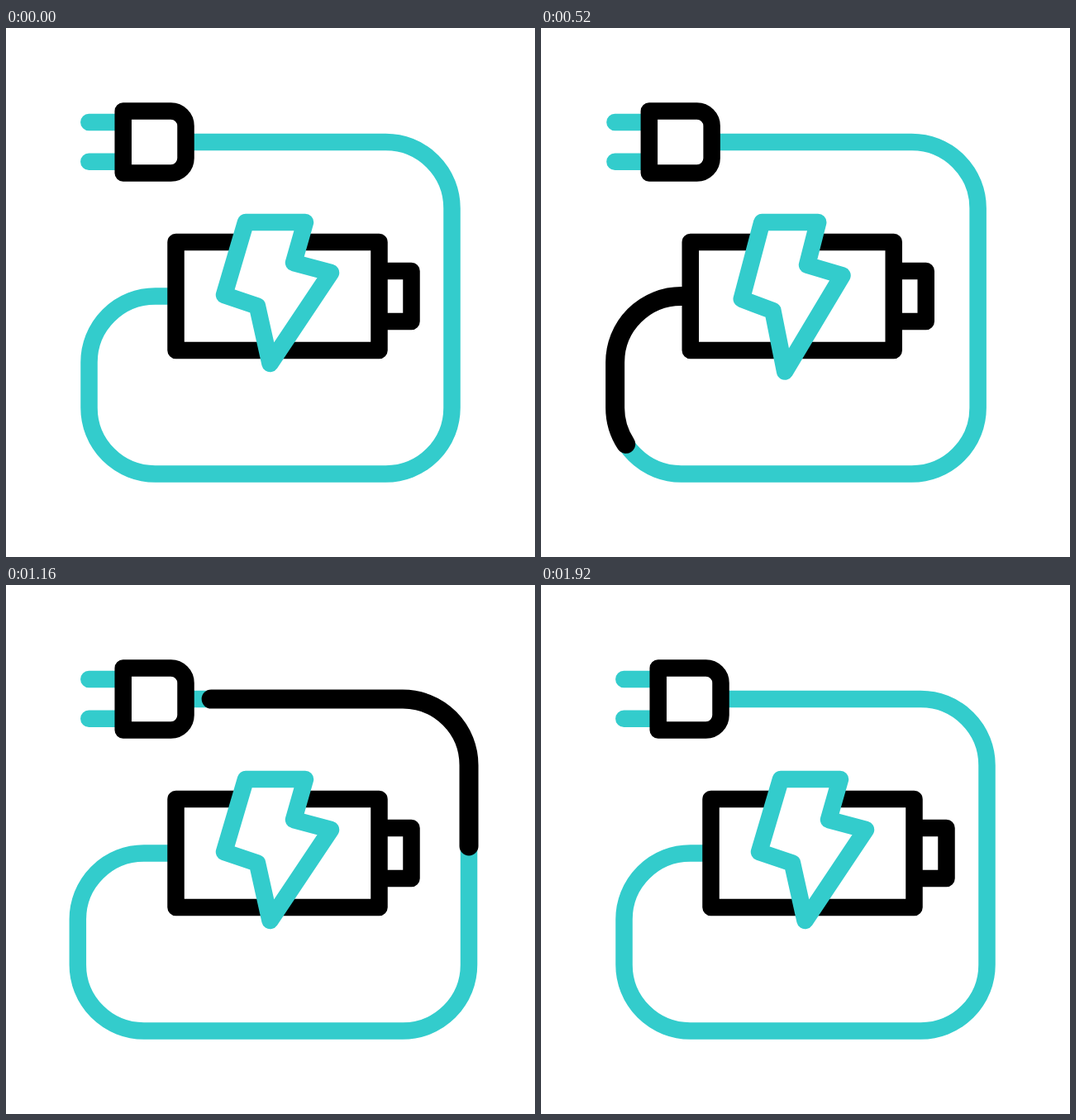
Write an HTML page that moves like this. It is 640 px wide and 640 px high and loops after 2.08 s.

```html
<!DOCTYPE html>
<html lang="en">
<head>
<meta charset="utf-8">
<title>Charging battery</title>
<style>
html, body { margin: 0; width: 100%; height: 100%; overflow: hidden; background: #fff; }
svg { display: block; width: 100%; height: 100%; fill: none; stroke-width: 20.5; stroke-linecap: round; stroke-linejoin: round; }
.teal { stroke: #3cc; }
.black { stroke: #000; }
.solid { fill: #fff; }
#pulse { stroke-width: 23; }
</style>
</head>
<body>
<svg viewBox="0 0 640 640">
  <path id="cord" class="teal"/>
  <path id="pulse" class="black" pathLength="1"/>
  <path id="spark" class="teal" pathLength="1" d="M128 143 109 130 90 143 71 130 52 143 34 130"/>
  <g id="plug">
    <path class="teal" d="M100.3 114H141M100.3 161.7H141"/>
    <path class="black solid" d="M141.7 100.5H199.5a18 18 0 0 1 18 18V157.5a18 18 0 0 1-18 18H141.7Z"/>
  </g>
  <g id="battery">
    <path class="black" d="M451.5 294H490.5V355H451.5"/>
    <path class="black solid" d="M205.5 259H451.5V390H205.5Z"/>
    <path id="bolt" class="teal solid"/>
  </g>
</svg>
<script>
const STEP = 40, STEPS = 52;
const BOLT = [[290, 235], [362, 235], [348, 284], [393, 296], [319.5, 406], [304, 336.5], [264, 323]];
const el = id => document.getElementById(id);
const clamp = u => Math.min(1, Math.max(0, u));
const smooth = u => u * u * (3 - 2 * u);
const cubic = u => u < .5 ? 4 * u ** 3 : 1 - 4 * (1 - u) ** 3;
const easeOut = u => 1 - (1 - u) ** 2;
const span = (n, from, to, ease) => ease(clamp((n - from) / (to - from)));

// Eased value through [step, value] keys
function track(n, ...keys) {
  let value = keys[0][1];
  for (let i = 1; i < keys.length; i++) {
    const [from, a] = keys[i - 1], [to, b] = keys[i];
    value += (b - a) * span(n, from, to, smooth);
  }
  return value;
}

// Show only the part of a path between two fractions of its length
function trim(path, tail, head) {
  path.style.display = head > tail + .001 ? '' : 'none';
  path.setAttribute('stroke-dasharray', `${Math.max(0, head - tail)} 3`);
  path.setAttribute('stroke-dashoffset', -tail);
}

function cordPath(start, left, right, end) {
  return `M${start} 324.5H${left + 80}a80 80 0 0 0-80 80V459.5a80 80 0 0 0 80 80` +
    `H${right - 80}a80 80 0 0 0 80-80V218a80 80 0 0 0-80-80H${end}`;
}

function draw(n) {
  const recoil = track(n, [29, 0], [37, 24], [48, 0]);
  const pull = track(n, [2, 0], [10, -13.3], [21, 0]);
  const battery = track(n, [2, 0], [12.5, -25], [21, 0]) + recoil;
  const plug = pull + recoil * .36;
  const stretch = track(n, [13, 0], [20, 1], [37, 0]);
  const squash = track(n, [2, 0], [6, .052], [13, -.056], [21, 0]);
  const shift = pull + recoil;

  const cord = cordPath(205.5 + battery, 100.5 + shift - 30 * stretch,
    539.5 + shift + 45 * stretch, 215 + plug);
  el('cord').setAttribute('d', cord);
  el('pulse').setAttribute('d', cord);
  trim(el('pulse'), span(n, 9.8, 44.2, cubic), span(n, .8, 35.2, cubic));
  trim(el('spark'), span(n, 34.7, 48, smooth), span(n, 32, 48, easeOut));

  el('plug').setAttribute('transform', `translate(${plug})`);
  el('battery').setAttribute('transform', `translate(${battery})`);
  const points = BOLT.map(([x, y]) =>
    [326 + (x - 326) * (1 + squash), 235 + (y - 235) * (1 - squash)]);
  el('bolt').setAttribute('d', `M${points.join(' ')}Z`);
}

function frame() {
  draw(Math.floor(performance.now() / STEP) % STEPS);
  requestAnimationFrame(frame);
}
frame();
</script>
</body>
</html>
```
